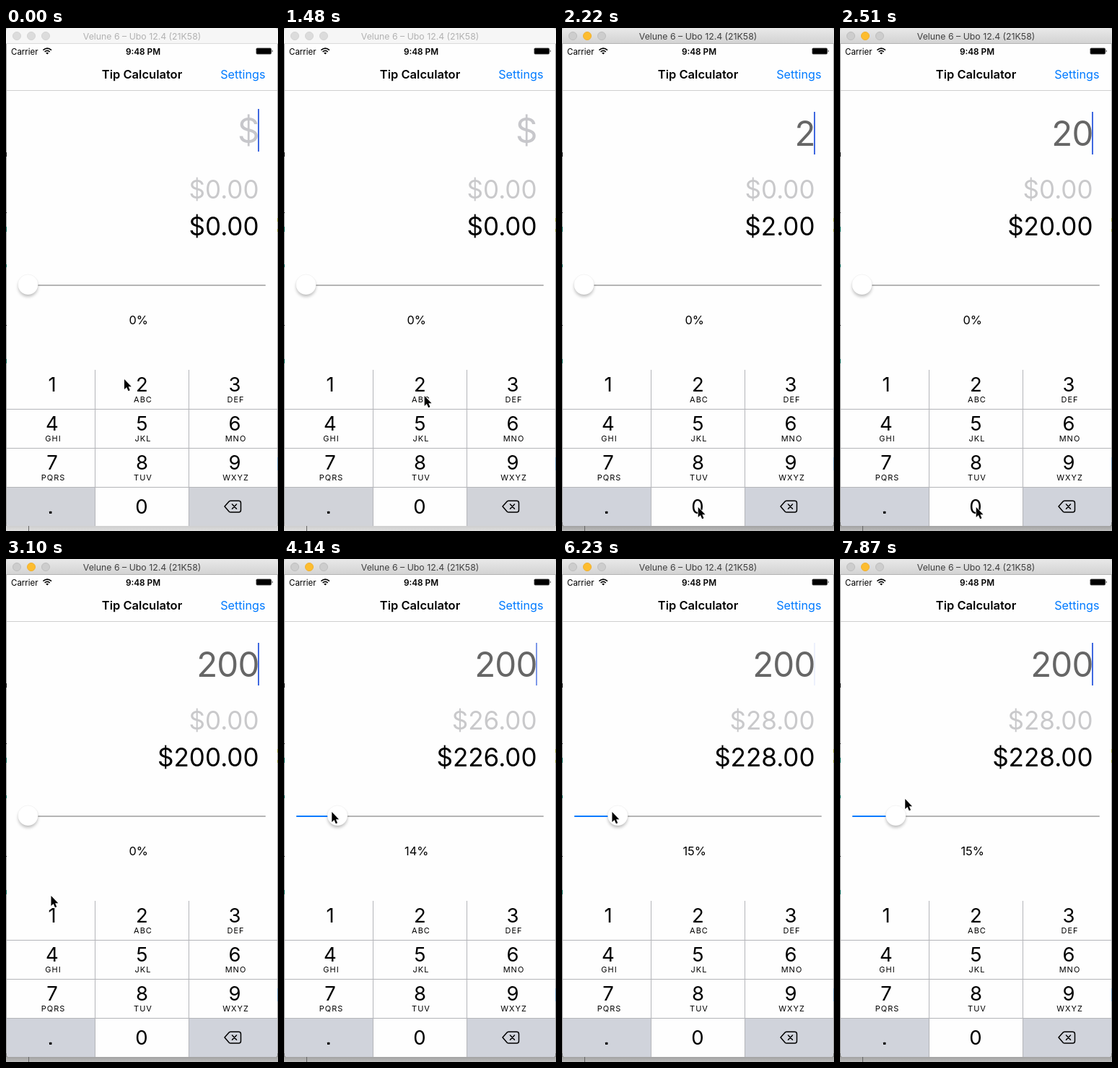
Write an HTML page that moves like this. It is 377 px wide and 696 px high and loops after 8 s.

```html
<!DOCTYPE html>
<html lang="en">
<head>
<meta charset="utf-8">
<title>Tip Calculator</title>
<style>
  html, body { margin: 0; width: 100%; height: 100%; overflow: hidden; background: #fff; }
  svg { display: block; width: 377px; height: 696px; font-family: Inter, Roboto, sans-serif; }
  .mid { text-anchor: middle; }
  .end { text-anchor: end; }
  .sub { font-size: 11px; letter-spacing: 1px; }
  .key { font-size: 27.5px; }
  .line { stroke: #b4b5b9; shape-rendering: crispEdges; }
  .inactive .on, .active .off { display: none; }
  .dark { fill: #d1d3d9; }
  .active .dark { fill: #d0d3db; }
  #wintitle { fill: #b2b2b2; font-size: 12.3px; }
  .active #wintitle { fill: #404040; }
</style>
</head>
<body>
<svg id="stage" class="inactive" viewBox="0 0 377 696">
  <defs>
    <linearGradient id="bar" x2="0" y2="1">
      <stop stop-color="#e9e9e9"/><stop offset="1" stop-color="#d2d2d2"/>
    </linearGradient>
    <linearGradient id="soft" x2="0" y2="1">
      <stop stop-color="#c4c4c4"/><stop offset="1" stop-color="#dedede"/>
    </linearGradient>
    <linearGradient id="deep" x2="0" y2="1">
      <stop stop-color="#909090"/><stop offset="1" stop-color="#bcbcbc"/>
    </linearGradient>
    <filter id="shade" x="-50%" y="-50%" width="200%" height="200%">
      <feGaussianBlur stdDeviation="2"/>
    </filter>
    <clipPath id="frame"><rect x="1" width="375" height="689" rx="4"/></clipPath>
  </defs>

  <!-- desktop behind the window -->
  <rect width="377" height="696" fill="#cfcfcf"/>
  <rect class="off" y="684" width="377" height="12" fill="url(#soft)"/>
  <rect class="on" y="684" width="377" height="12" fill="url(#deep)"/>
  <path d="M31.5 689V696" stroke="#666"/>
  <path d="M0 172v6M0 255v1M0 411v1" stroke="#222" stroke-width="2"/>
  <path d="M0 275v7M0 327v4M0 458v6" stroke="#1d8f7c" stroke-width="2"/>
  <path d="M377 263v5M377 278v4" stroke="#b5b944" stroke-width="2"/>
  <path d="M377 594v18" stroke="#8cbbe0" stroke-width="2"/>

  <!-- title bar -->
  <path d="M0 22V5Q0 0 5 0H372Q377 0 377 5V22Z" class="off" fill="#f6f6f6"/>
  <path d="M0 22V5Q0 0 5 0H372Q377 0 377 5V22Z" class="on" fill="url(#bar)"/>
  <path d="M0 21.5H377" class="off" stroke="#dadada"/>
  <path d="M0 21.5H377" class="on" stroke="#b4b4b4"/>
  <g class="off" fill="#dcdcdc" stroke="#d4d4d4">
    <circle cx="15" cy="11" r="5.5"/><circle cx="35" cy="11" r="5.5"/><circle cx="55" cy="11" r="5.5"/>
  </g>
  <g class="on" fill="#cdcdcd" stroke="#bebebe">
    <circle cx="15" cy="11" r="5.5"/>
    <circle cx="35" cy="11" r="5.5" fill="#fdbd2f" stroke="#f0b030"/>
    <circle cx="55" cy="11" r="5.5"/>
  </g>
  <text id="wintitle" class="mid" x="188.5" y="16">Velune 6 – Ubo 12.4 (21K58)</text>

  <g clip-path="url(#frame)">
    <rect y="22" width="377" height="667" fill="#fefefe"/>

    <!-- status bar -->
    <text x="7" y="36.5" font-size="11.5">Carrier</text>
    <g fill="none" stroke="#000" stroke-width="1.6">
      <path d="M51.4 30.6Q57.2 25.6 63 30.6M53.6 33Q57.2 29.8 60.8 33"/>
      <path d="M57.2 36.6L55.2 34.5Q57.2 33 59.2 34.5Z" fill="#000" stroke="none"/>
    </g>
    <text class="mid" x="190" y="36.5" font-size="11.8" font-weight="600">9:48 PM</text>
    <rect x="346.5" y="27.5" width="21.5" height="9" rx="1.8" fill="#555"/>
    <rect x="347.3" y="28.3" width="19.9" height="7.4" rx="1"/>
    <path d="M368.7 30.3Q370.6 32 368.7 33.8Z"/>

    <!-- navigation bar -->
    <text class="mid" x="188.5" y="70" font-size="16.5" font-weight="600">Tip Calculator</text>
    <text class="end" x="359.5" y="70" font-size="16.2" fill="#007aff">Settings</text>
    <path d="M1 86.5H376" stroke="#cfcfcf"/>

    <!-- amounts -->
    <text id="bill" class="end" x="350.7" y="159" font-size="47.5" letter-spacing="-.8"></text>
    <rect id="caret" x="349" width="2" height="59" fill="#4068e0"/>
    <text id="tip" class="end" x="350.5" y="235.5" font-size="35" fill="#c9c9cb"></text>
    <text id="total" class="end" x="350.5" y="286.5" font-size="35"></text>

    <!-- slider -->
    <rect x="17" y="355" width="343" height="2" rx="1" fill="#b5b5b5"/>
    <rect id="fill" x="17" y="355" width="14" height="2" rx="1" fill="#007aff"/>
    <g id="thumb">
      <circle cy="358.3" r="13.5" opacity=".25" filter="url(#shade)"/>
      <circle cy="355" r="14" fill="#fff" stroke="#000" stroke-opacity=".08" stroke-width=".6"/>
    </g>
    <text id="percent" class="mid" x="183.7" y="409.5" font-size="16.4"></text>

    <!-- keypad -->
    <rect class="dark" x="1" y="635" width="122" height="54"/>
    <rect class="dark" x="254" y="635" width="122" height="54"/>
    <rect id="press" class="dark" x="124" width="129" height="54"/>
    <path class="line" d="M1 527.5H376M1 581.5H376M1 635.5H376M123.5 473V689M253.5 473V689"/>
    <g id="keys"></g>
    <rect x="60" y="668.7" width="3.4" height="3.4" rx=".6"/>
    <g fill="none" stroke="#000" stroke-width="1.5" stroke-linejoin="round" stroke-linecap="round">
      <path d="M303 662L309 655.3Q310 654.2 311.5 654.2H322.5Q325.5 654.2 325.5 657.2V667Q325.5 670 322.5 670H311.5Q310 670 309 668.9Z"/>
      <path d="M313.5 659L319.5 665.2M319.5 659L313.5 665.2"/>
    </g>
  </g>
  <path d="M.5 22V689M376.5 22V689" stroke="#000" stroke-opacity=".2"/>

  <path id="pointer" d="M0 0V14L3.2 11L5.5 16.2L7.8 15.2L5.6 10.2H9.8Z"
        stroke="#fff" stroke-width="1.4" paint-order="stroke"/>
</svg>
<script>
  const LOOP = 8000, STEP = 148.3;
  const $ = id => document.getElementById(id);
  const set = (id, name, value) => $(id).setAttribute(name, value);
  const clamp = u => Math.min(1, Math.max(0, u));
  const ease = u => u * u * (3 - 2 * u);

  const labels = ['', 'ABC', 'DEF', 'GHI', 'JKL', 'MNO', 'PQRS', 'TUV', 'WXYZ'];
  const keyText = (n, x, y) => `<text class="mid key" x="${x}" y="${y}">${n}</text>`;
  $('keys').innerHTML = labels.map((s, i) => {
    const x = 62 + 126.5 * (i % 3) + 2 * (i % 3 !== 1), y = 503 + 54 * Math.floor(i / 3);
    return keyText(i + 1, x, y) + `<text class="mid sub" x="${x + 1.5}" y="${y + 15}">${s}</text>`;
  }).join('') + keyText(0, 188, 672);

  // Pointer hops and slider drags; the pointer also follows the drag.
  const hops = [
    { at: 1040, ms: 440, to: [194.7, 509] },
    { at: 1780, ms: 440, to: [188.7, 663] },
    { at: 2680, ms: 420, to: [62.5, 466] },
    { at: 3120, ms: 140, to: [55, 387] },
    { at: 3400, ms: 300, to: [22.7, 350] },
    { at: 7500, ms: 360, to: [43.5, 332] }
  ];
  const drags = [
    { at: 3850, ms: 300, to: [13.8] },
    { at: 4200, ms: 380, to: [14.4] },
    { at: 5000, ms: 340, to: [14.8] }
  ];
  const presses = [1750, 2350, 2650], FOCUS = 1600;

  const follow = (moves, from, t) => moves.reduce((p, { at, ms, to }) => {
    const u = ease(clamp((t - at) / ms));
    return p.map((v, i) => v + (to[i] - v) * u);
  }, from);

  // One blink per second; solid for a while after typing.
  function caretAlpha(t, sinceKey) {
    const phase = t % 1000;
    if (sinceKey < 500) return 1;
    return clamp((240 - phase) / 130) + clamp((phase - 540) / 150);
  }

  const money = n => '$' + n.toFixed(2);

  function draw(t) {
    const done = presses.filter(p => p <= t), bill = '200'.slice(0, done.length);
    const sinceKey = done.length ? t - done[done.length - 1] : Infinity;
    const [value] = follow(drags, [0], t), [px, py] = follow(hops, [164, 486], t);
    const tip = bill * Math.floor(value) / 100, drag = value * 3.16;

    set('stage', 'class', t < FOCUS ? 'inactive' : 'active');
    $('bill').textContent = bill || '$';
    set('bill', 'y', bill ? 163 : 159);
    set('bill', 'fill', bill ? '#666' : '#c7c7cb');
    set('caret', 'y', bill ? 116 : 112);
    set('caret', 'opacity', caretAlpha(t, sinceKey));
    $('tip').textContent = money(tip);
    $('total').textContent = money(+bill + tip);
    $('percent').textContent = Math.round(value) + '%';
    set('fill', 'width', 13.5 + drag);
    set('thumb', 'transform', `translate(${30.5 + drag} 0)`);
    set('press', 'y', done.length > 1 ? 635 : 473);
    set('press', 'visibility', sinceKey < 140 ? 'visible' : 'hidden');
    set('pointer', 'transform', `translate(${px + drag} ${py})`);
  }

  const start = performance.now();
  function tick() {
    const t = (performance.now() - start) % LOOP;
    draw(Math.floor((t + 15) / STEP) * STEP);
    requestAnimationFrame(tick);
  }
  tick();
</script>
</body>
</html>
```
